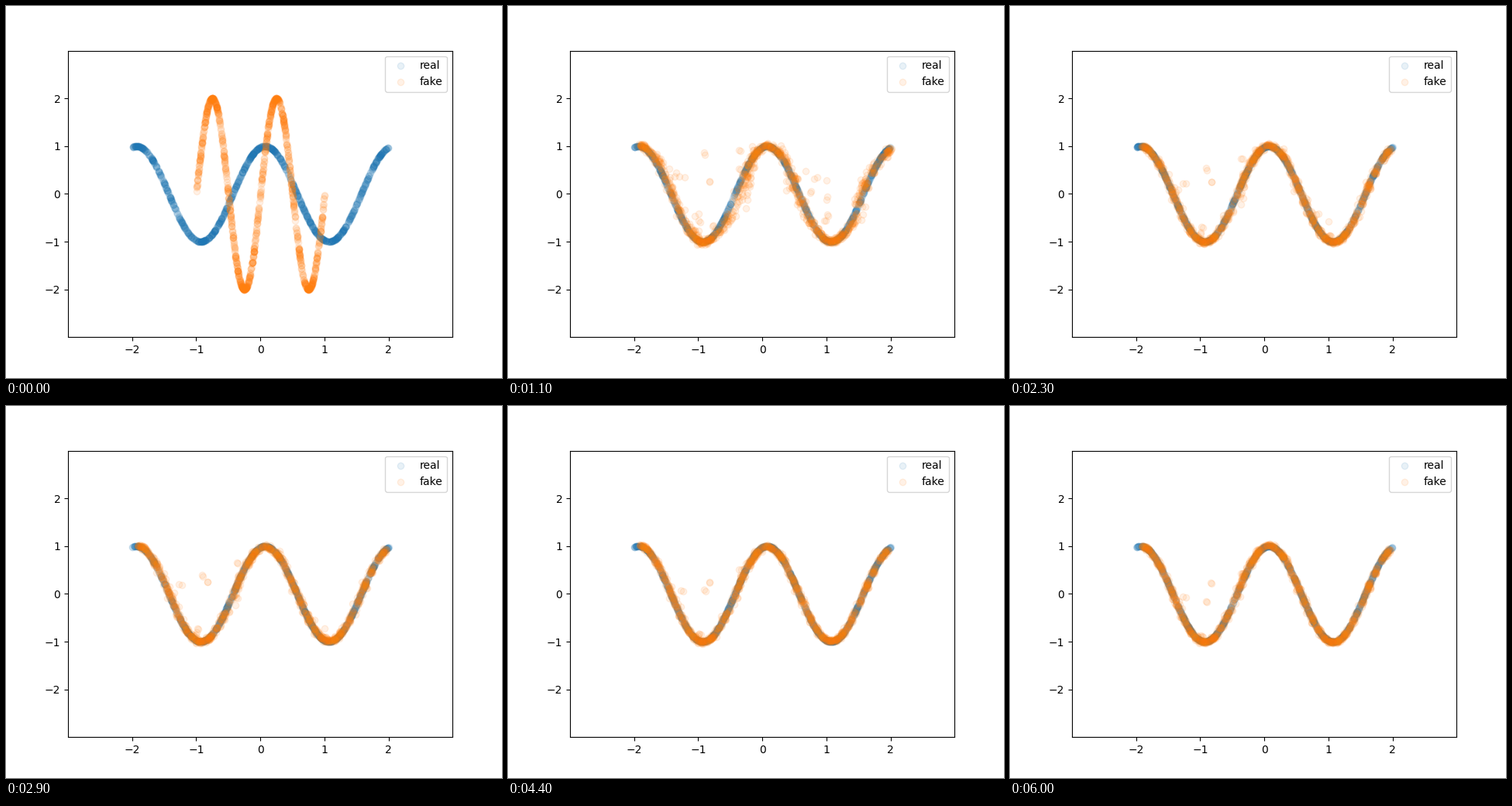
Animation of 640x480 px, one loop 6.1 s. Source, as a matplotlib script:

```python
import numpy as np
import matplotlib.pyplot as plt
from matplotlib.animation import FuncAnimation

FRAMES, STEP = 61, 100
COUNT = 1000
GATHER = 6          # frames until the points first reach the wave
SPOTS = 36          # stray pairs left between the crests

rng = np.random.default_rng(11)


def wave(x):
    return np.sin(np.pi * x + 1.35)


def strands(x):
    """Bunch points at the crests and shift pieces of the slopes sideways."""
    phase = x - 0.07
    bunched = x - 0.09 * np.sin(2 * np.pi * phase)
    block = ((x + 2) / 0.25).astype(int)
    shift = rng.uniform(-0.28, 0.28, block.max() + 1)[block]
    moved = bunched + shift * np.sin(np.pi * phase) ** 2
    return np.column_stack([moved, 1.02 * wave(bunched)])


def strays(n):
    """Loose spots in the dips, some of them level with the crests."""
    x = rng.uniform(-1.6, 1.05, n)
    height = np.where(rng.random(n) < 0.4, 1, rng.random(n))
    return np.column_stack([x, wave(x) + height * (1 - wave(x))])


start_x = np.sort(rng.uniform(-1, 1, COUNT))
start = np.column_stack([start_x, 2 * np.sin(2 * np.pi * start_x)])

home_x = np.sort(rng.uniform(-1.92, 1.96, COUNT))
home = np.column_stack([home_x, wave(home_x)])
lean = rng.normal(size=(COUNT, 2))

early = strands(home_x)
settle = 1 + rng.exponential(3.5, COUNT)

# Each stray spot holds two neighbouring points that settle together.
spots = strays(SPOTS)
first = np.clip(np.searchsorted(home_x, spots[:, 0]), 0, COUNT - 2)
patience = rng.lognormal(np.log(8), 1.6, SPOTS)
for k in (0, 1):
    early[first + k] = spots
    settle[first + k] = patience


def fake_points(frame):
    if frame == 0:
        return start
    age = max(0, frame - GATHER)
    left = np.exp(-age / settle)[:, None]
    pts = home + left * (early - home)
    pts += (0.016 + 0.012 * np.exp(-age / 12)) * lean
    pts[:, 1] += 0.015 * np.sin(2.3 * home_x + 1.7 * frame)
    pts += np.random.default_rng(frame).normal(0, 0.005, pts.shape)
    u = 1 - (1 - min(1, frame / GATHER)) ** 2
    return (1 - u) * start + u * pts


def real_points(frame):
    x = np.random.default_rng(500 + frame).uniform(-2, 2, COUNT)
    return np.column_stack([x, wave(x)])


fig, ax = plt.subplots(figsize=(6.4, 4.8), dpi=100)
real = ax.scatter([], [], color="tab:blue", alpha=0.1, label="real")
fake = ax.scatter([], [], color="tab:orange", alpha=0.1, label="fake")
# Limits just inside 3 keep the outermost ticks at 2.
ax.set(xlim=(-2.998, 2.994), ylim=(-2.9995, 2.9995))
ax.legend(loc="upper right")


def draw(frame):
    real.set_offsets(real_points(frame))
    fake.set_offsets(fake_points(frame))
    return real, fake


anim = FuncAnimation(fig, draw, frames=FRAMES, interval=STEP,
                     repeat=True, repeat_delay=0)
plt.show()
```
